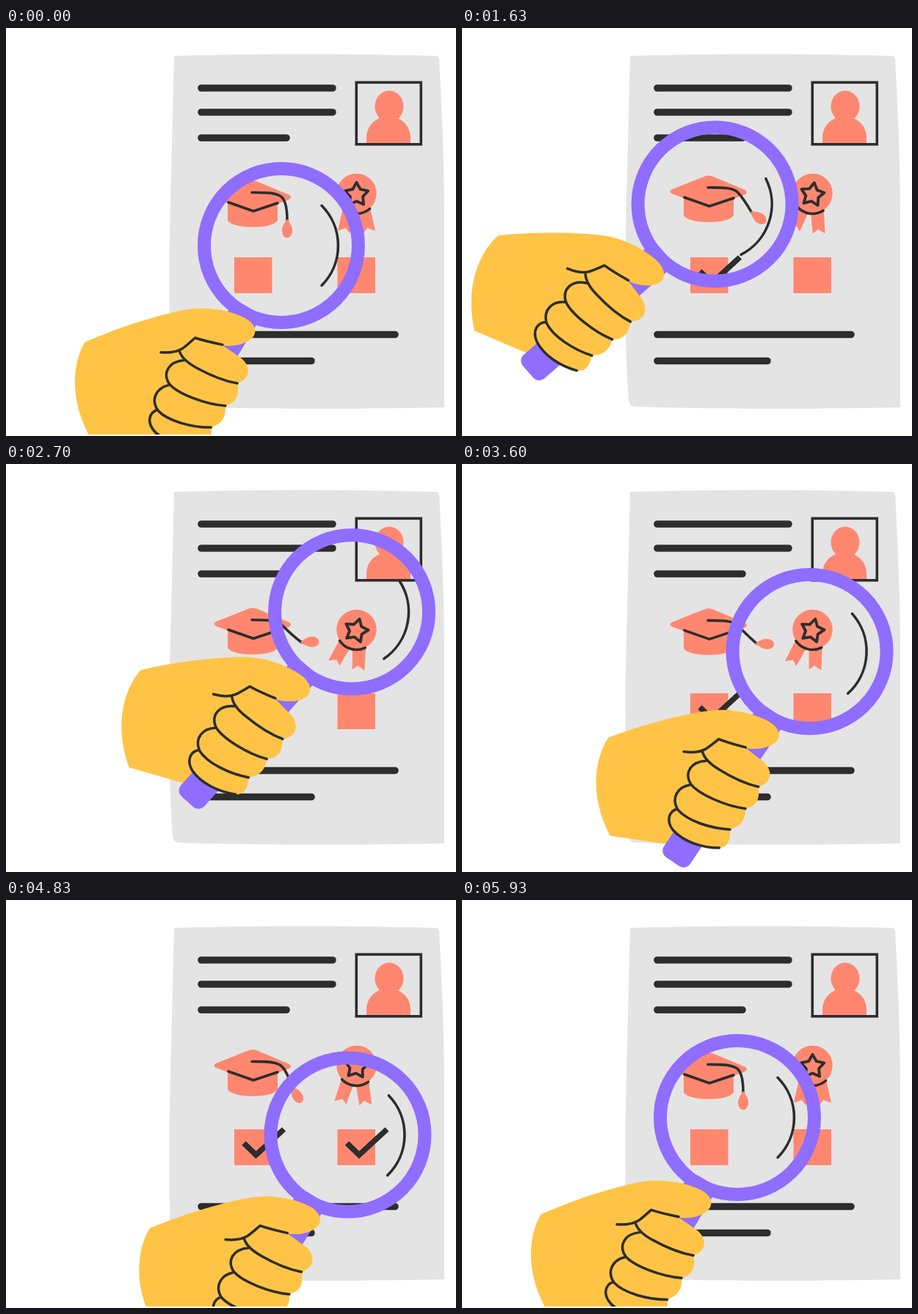
Recreate the animation shown at these times as an HTML page with a canvas. Size 613 px wide and 557 px high, loop 6010 ms.

```html
<!DOCTYPE html>
<html lang="en">
<head>
<meta charset="utf-8">
<title>Resume review</title>
<style>
html, body { margin: 0; width: 100%; height: 100%; overflow: hidden; background: #fff; }
canvas { display: block; }
</style>
</head>
<body>
<canvas id="stage" width="613" height="557"></canvas>
<script>
const ctx = document.getElementById('stage').getContext('2d');
const LOOP = 6010;
const INK = '#2d2d2d', PAPER = '#e4e4e4', CORAL = '#ff8770', PURPLE = '#8f6dff', SKIN = '#ffc445';
const RAD = Math.PI / 180;

// Lens stops: x, y, tilt in degrees
const STOPS = [
  [375, 297, 0],
  [340.3, 241.8, 18.3],
  [472, 201.6, 10.8],
  [489.4, 326.7, 1.2]
];
const STARTS = [-30, 1480, 2960, 4440];
const MOVE = 1290;
// How far each move bows away from a straight path
const BOWS = [[2.7, -2.8, 0], [0, 0, 0], [-7, -7.5, -3], [0, 0, 0]];
const GRIP_TILT = 13.8;

const shape = {
  page: 'M229 38 Q400 33 586 38 Q590 39 590 43 Q596 150 597 240 V518 Q400 522 235 517 Q228 516 227 508 Q219 400 225 200 Z',
  person: 'M491 157 V150 C491 132 505 121 521 121 C537 121 551 132 551 150 V157 Z',
  capTop: 'M286 227 L330 209.500 Q336 207 342 209.500 L386 228 Q390 231 386 234 L337 252 L286 233 Q281 230 286 227 Z',
  capBase: 'M302 238 V262 C306 275 366 275 370 262 V238 Z',
  capFold: 'M303 238 L337 250 L370 239',
  drop: 'M0 -2 C3 3 7 8 7 14 C7 21 3 24 0 24 C-3 24 -7 21 -7 14 C-7 8 -3 3 0 -2 Z',
  ribbon: 'M-18 17 L-25.500 51 L-15 47 L-9 54 L-1 24 Z',
  palm: 'M60 318 C110 309 170 305 208 308 L240 366 L180 480 L118 478 L37 450 C16 380 44 333 60 318 Z',
  grip: 'M208 308 C236 311 262 324 276 335 C292 347 293 362 280 368 C268 373 254 372 241 367 ' +
    'L257 385 Q266 393 267 405 Q266 420 248 422 Q247 448 225 448 Q222 470 199 472 Q196 496 180 494 ' +
    'C158 490 134 477 123 459 C115 444 122 432 134 431 L100 400 L100 312 Z',
  creases: 'M157 356 Q175 362 187 358 Q194 355 207 348 Q218 355 241 366 ' +
    'M182 361 Q183 374 200 389 Q225 412 248 422 ' +
    'M185 374 C164 371 152 384 158 401 C166 417 200 440 225 448 ' +
    'M157 402 C140 402 128 414 134 432 C144 450 174 466 199 472 ' +
    'M134 431 C122 432 115 444 123 459 C134 477 158 490 180 494'
};
for (const name in shape) shape[name] = new Path2D(shape[name]);

function fill(path, color) {
  ctx.fillStyle = color;
  ctx.fill(path);
}

function stroke(path, width, color = INK, cap = 'round', join = 'round') {
  ctx.strokeStyle = color;
  ctx.lineWidth = width;
  ctx.lineCap = cap;
  ctx.lineJoin = join;
  ctx.stroke(path);
}

function polyline(points) {
  const path = new Path2D();
  points.forEach(([x, y]) => path.lineTo(x, y));
  return path;
}

function arc(x, y, r, from = 0, to = 360) {
  const path = new Path2D();
  path.arc(x, y, r, from * RAD, to * RAD);
  return path;
}

function group(x, y, deg, draw) {
  ctx.save();
  ctx.translate(x, y);
  ctx.rotate(deg * RAD);
  draw();
  ctx.restore();
}

const clamp = v => Math.min(1, Math.max(0, v));
const ease = v => 0.5 - 0.5 * Math.cos(Math.PI * clamp(v));

function lensPose(t) {
  let i = 3;
  while (t < STARTS[i]) i--;
  const p = ease((t - STARTS[i]) / MOVE);
  const from = STOPS[i], to = STOPS[(i + 1) % 4];
  return from.map((v, j) => v + (to[j] - v) * p + 4 * p * (1 - p) * BOWS[i][j]);
}

function drawPage() {
  fill(shape.page, PAPER);
  [[82, 445], [115, 445], [150, 382], [418.5, 530], [454.5, 416]].forEach(([y, end]) =>
    stroke(polyline([[266, y], [end, y]]), 9.6));
  const head = new Path2D();
  head.ellipse(522, 107, 19.5, 21.5, 0, 0, 2 * Math.PI);
  fill(head, CORAL);
  fill(shape.person, CORAL);
  ctx.strokeRect(0, 0, 0, 0);
  ctx.lineWidth = 3.6;
  ctx.lineJoin = 'miter';
  ctx.strokeStyle = INK;
  ctx.strokeRect(477.3, 74.3, 88, 84.5);
}

function drawCap(k) {
  group(0, -12 * k, 0, () => {
    fill(shape.capBase, CORAL);
    fill(shape.capTop, CORAL);
    stroke(shape.capFold, 3.6);
    const x = 383 + 20 * k, y = 262.5 - 7.5 * k, a = 55 * k * RAD;
    const cord = new Path2D();
    cord.moveTo(335, 224.5);
    cord.bezierCurveTo(352, 225, 364, 224, 373, 229);
    cord.bezierCurveTo(381, 233 + 4 * k, x - 14 * Math.sin(a), y - 14 * Math.cos(a), x, y);
    stroke(cord, 3.6);
    group(x, y, -95 * k, () => fill(shape.drop, CORAL));
  });
}

function drawBadge(k) {
  group(477.5, 226, 16 * k, () => {
    fill(shape.ribbon, CORAL);
    ctx.save();
    ctx.scale(-1, 1);
    fill(shape.ribbon, CORAL);
    ctx.restore();
    fill(arc(0, 0, 27.3), CORAL);
    stroke(arc(0, 0, 27.5, 49, 131), 3.6);
    const star = new Path2D();
    for (let i = 0; i < 10; i++) {
      const r = i % 2 ? 9 : 16.5, a = (i * 36 - 90) * RAD;
      star.lineTo(r * Math.cos(a), 1.5 + r * Math.sin(a));
    }
    star.closePath();
    stroke(star, 3.8);
  });
}

function drawBox(x, p) {
  ctx.fillStyle = CORAL;
  ctx.fillRect(x, 313, 51.5, 49);
  if (p <= 0) return;
  const a = [x + 13, 332], b = [x + 29.5, 348], c = [x + 67.5, 313];
  const mix = (u, v, q) => [u[0] + (v[0] - u[0]) * q, u[1] + (v[1] - u[1]) * q];
  const points = [a, mix(a, b, clamp(p / 0.3))];
  if (p > 0.3) points.push(mix(b, c, (p - 0.3) / 0.7));
  stroke(polyline(points), 7.5, INK, 'butt', 'miter');
}

function drawLens([x, y, tilt]) {
  // The hand is drawn in page coordinates around a lens at (351, 253.5)
  const inHand = draw => group(x, y, tilt - GRIP_TILT, () => {
    ctx.translate(-351, -253.5);
    draw();
  });
  inHand(() => {
    fill(shape.palm, SKIN);
    group(277, 335.5, 134.6, () => {
      const handle = new Path2D();
      handle.roundRect(-15, -21.5, 247, 43, 11);
      fill(handle, PURPLE);
    });
  });
  stroke(arc(x, y, 105), 18, PURPLE);
  stroke(arc(x, y, 77.5, tilt - 44.7, tilt + 44.7), 3.6);
  inHand(() => {
    fill(shape.grip, SKIN);
    stroke(shape.creases, 3.5);
  });
}

function render(t) {
  const k = (1 - Math.cos(2 * Math.PI * t / LOOP)) / 2;
  const ticked = t < 5900;
  ctx.fillStyle = '#fff';
  ctx.fillRect(0, 0, 613, 557);
  ctx.save();
  ctx.beginPath();
  ctx.rect(0, 0, 613, 555);
  ctx.clip();
  drawPage();
  drawCap(k);
  drawBadge(k);
  drawBox(311, ticked ? clamp((t - 200) / 400) : 0);
  drawBox(451.5, ticked ? clamp((t - 4150) / 350) : 0);
  drawLens(lensPose(t));
  ctx.restore();
}

// The picture steps twice every 100 ms
function snap(t) {
  const base = Math.floor(t / 100) * 100;
  return Math.min(5930, base + (t - base >= 30 ? 30 : 0));
}

const begin = performance.now();
function tick() {
  render(snap((performance.now() - begin) % LOOP));
  requestAnimationFrame(tick);
}
tick();
</script>
</body>
</html>
```
